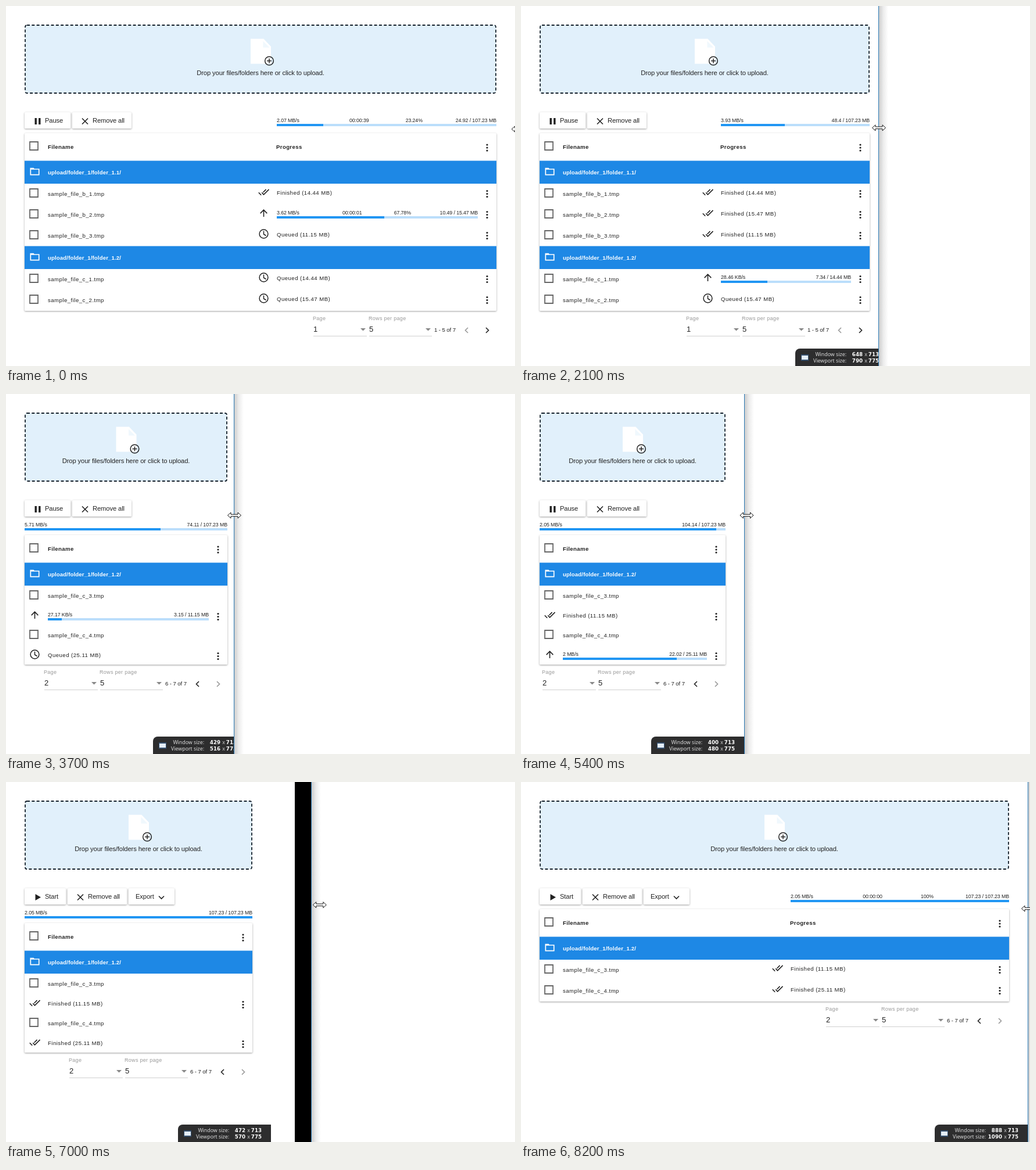
An HTML page with a canvas for the animation above (8500 ms loop, 876 px wide and 620 px high).

```html
<!DOCTYPE html>
<html lang="en">
<head>
<meta charset="utf-8">
<title>Responsive upload table</title>
<style>
html, body { margin: 0; width: 100%; height: 100%; overflow: hidden; background: #fff; }
canvas { display: block; }
</style>
</head>
<body>
<canvas id="stage" width="876" height="620"></canvas>
<script>
const ctx = document.getElementById('stage').getContext('2d');
const LOOP = 8500, LEFT = 32, TOTAL = 107.23, BAR_LAG = 2.2;
const INK = '#212121', BLUE = '#1e88e5', PALE = '#e1f0fb';

// Key points: ms, then window edge and the laid-out width that trails it.
const resize = [
  [600, 880, 876], [1500, 782, 800], [2100, 615, 632], [2800, 472, 497], [3700, 392, 413],
  [4200, 384, 384], [6500, 384, 384], [7000, 525, 456], [7400, 730, 672], [8200, 872, 872]
];
// Key points: ms, then megabytes sent and speed.
const upload = [
  [600, 24.924, 2.07], [2100, 48.4, 3.93], [2800, 60.74, 5.66],
  [3700, 74.114, 5.71], [5400, 104.14, 2.05], [5600, TOTAL, 2.05]
];

const files = [
  ['b_1', 14.438, 3.5, 'MB/s'], ['b_2', 15.47, 3.62, 'MB/s'], ['b_3', 11.15, 3.21, 'MB/s'],
  ['c_1', 14.44, 28.46, 'KB/s'], ['c_2', 15.47, 27.86, 'KB/s'],
  ['c_3', 11.15, 27.17, 'KB/s'], ['c_4', 25.11, 2, 'MB/s']
].map(([id, size, speed, unit]) => ({ id, size, speed, unit }));
files.reduce((sum, f) => (f.start = sum) + f.size, 0);
const pages = [
  [['1.1', files.slice(0, 3)], ['1.2', files.slice(3, 5)]],
  [['1.2', files.slice(5)]]
];

const SANS = '"Liberation Sans", Arial, sans-serif';
const type = {
  body: ['11.2px ' + SANS, -0.1],
  cell: ['9.6px ' + SANS, 0.47],
  head: ['bold 9.6px ' + SANS, 0.38],
  group: ['bold 9.6px ' + SANS, 0.15],
  stat: ['8.8px ' + SANS, -0.1],
  label: ['9px ' + SANS, 0.3],
  value: ['13px ' + SANS, 0],
  range: ['9.6px ' + SANS, -0.1],
  badge: ['8.8px "Noto Sans", sans-serif', 0],
  size: ['bold 8.7px "DejaVu Sans", sans-serif', 0]
};

const clamp = (v, lo = 0, hi = 1) => Math.min(hi, Math.max(lo, v));

function at(keys, t, col) {
  const i = keys.findIndex(k => k[0] > t);
  if (i < 1) return keys[i ? keys.length - 1 : 0][col];
  const a = keys[i - 1], b = keys[i];
  return a[col] + (b[col] - a[col]) * (t - a[0]) / (b[0] - a[0]);
}

function text(s, x, y, style, color = INK, align = 'left') {
  [ctx.font, ctx.letterSpacing] = [style[0], style[1] + 'px'];
  ctx.fillStyle = color;
  ctx.textAlign = align;
  ctx.fillText(s, x, y);
}

function rect(x, y, w, h, color) {
  ctx.fillStyle = color;
  ctx.fillRect(x, y, w, h);
}

function shape(d, x, y, { fill, line, width = 1.6 }) {
  const path = new Path2D(d);
  ctx.save();
  ctx.translate(x, y);
  if (fill) {
    ctx.fillStyle = fill;
    ctx.fill(path);
  }
  if (line) {
    ctx.strokeStyle = line;
    ctx.lineWidth = width;
    ctx.stroke(path);
  }
  ctx.restore();
}
const fill = (d, x, y, color = INK) => shape(d, x, y, { fill: color });
const stroke = (d, x, y, line = INK, width) => shape(d, x, y, { line, width });

function disc(x, y, r) {
  ctx.beginPath();
  ctx.arc(x, y, r, 0, 2 * Math.PI);
}

function ring(x, y, r, hands) {
  disc(x, y, r);
  ctx.strokeStyle = INK;
  ctx.lineWidth = 1.5;
  ctx.stroke();
  stroke(hands, x, y, INK, 1.5);
}

function dots(x, y) {
  ctx.fillStyle = INK;
  for (const d of [-5, 0, 5]) {
    disc(x, y + d, 1.6);
    ctx.fill();
  }
}

function card(x, y, w, h) {
  ctx.save();
  ctx.shadowColor = 'rgba(0,0,0,.38)';
  ctx.shadowBlur = 3;
  ctx.shadowOffsetY = 1;
  ctx.fillStyle = '#fff';
  ctx.beginPath();
  ctx.roundRect(x, y, w, h, 1.5);
  ctx.fill();
  ctx.restore();
}

const checkbox = y => stroke('M-7-7H7V7H-7Z', 48, y, '#666', 1.8);
const chevron = (x, y, dir, color) => stroke(`M${-2 * dir}-4.5L${2.5 * dir} 0L${-2 * dir} 4.5`, x, y, color);
const clockText = s => new Date(Math.floor(s) * 1000).toISOString().slice(11, 19);
const short = n => String(+n.toFixed(2));

function progress(x, right, y, p, full) {
  const w = right - x, mid = (s, k) => text(s, x + w * k, y, type.stat, INK, 'center');
  text(short(p.speed) + ' ' + p.unit, x, y, type.stat);
  if (full) {
    mid(clockText((p.size - p.value) / p.speed), 3 / 8);
    mid(short(p.value / p.size * 100) + '%', 5 / 8);
  }
  text(short(p.value) + ' / ' + short(p.size) + ' MB', right, y, type.stat, INK, 'right');
  rect(x, y + 3, w, 4, '#bbdefb');
  rect(x, y + 3, Math.round(w * clamp((p.value - p.lag) / p.size)), 4, '#2196f3');
}

function dropZone(right) {
  const cx = (LEFT + right) / 2;
  ctx.beginPath();
  ctx.roundRect(33, 33, right - 34, 117, 3);
  ctx.fillStyle = PALE;
  ctx.fill();
  ctx.strokeStyle = '#14202b';
  ctx.lineWidth = 1.8;
  ctx.setLineDash([5, 3.3]);
  ctx.stroke();
  ctx.setLineDash([]);
  shape('M-14-20H4L15.5-8V19H-15.5V-20Z', cx + 0.5, 78.5, { fill: '#fff', line: '#fff', width: 4 });
  fill('M4-18V-7H15Z', cx + 0.5, 78.5, '#f0f8fd');
  ring(cx + 15, 94.5, 7.3, 'M-4 0H4M0-4V4');
  text('Drop your files/folders here or click to upload.', cx, 119, type.body, INK, 'center');
}

function buttons(done) {
  const first = done ? 71 : 79, x = LEFT + first + 3;
  card(LEFT, 183, first, 28);
  fill(done ? 'M1 0L10.5 5.5L1 11Z' : 'M0 0H3.4V11H0ZM6.6 0H10V11H6.6Z', 49.5, 193);
  text(done ? 'Start' : 'Pause', 67, 201, type.body);
  card(x, 183, 102, 28);
  stroke('M-5-5L5 5M5-5L-5 5', x + 22, 198.5);
  text('Remove all', x + 35, 201, type.body);
  if (!done) return;
  card(211, 183, 79, 28);
  text('Export', 223, 201, type.body);
  stroke('M-4.5-2L0 2.5L4.5-2', 267.5, 198.5);
}

function table(s) {
  const { right, col, narrow } = s, groups = pages[s.page], rowH = narrow ? 68 : 36;
  const count = groups.reduce((n, g) => n + g[1].length, 0);
  let y = narrow ? 243 : 219;
  const bottom = y + 48 + 39 * groups.length + rowH * count;
  card(LEFT, y, right - LEFT, bottom - y);
  checkbox(y + 22);
  text('Filename', 72, y + 27, type.head);
  if (!narrow) text('Progress', col - 1, y + 27, type.head);
  dots(right - 16, y + 25);
  y += 48;
  for (const [folder, list] of groups) {
    rect(LEFT, y - 0.5, right - LEFT, 39.5, BLUE);
    stroke('M-7.2-5.4H-2.4L-1-4H7.2V5.6H-7.2ZM-7-4H0', 49.5, y + 18, '#fff', 1.7);
    text('upload/folder_1/folder_' + folder + '/', 72, y + 23, type.group, '#fff');
    y += 39;
    for (const f of list) {
      checkbox(y + 16);
      text('sample_file_' + f.id + '.tmp', 72, y + 21, type.cell);
      status(f, narrow ? 72 : col, narrow ? y + 36 : y, s);
      y += rowH;
    }
  }
  return bottom;
}

function status(f, x, y, { right, loaded, lag, wide }) {
  const value = loaded - f.start, ix = x - 22.5, iy = y + 14.5, size = ` (${short(f.size)} MB)`;
  dots(right - 16, y + 17.5);
  if (value > f.size - 0.01) {
    stroke('M-3.2 .8L0 4.4L9-4.6M-8.7 .8L-4.3 5.2M4-4.6L-1 .5', ix, iy);
    text('Finished' + size, x, y + 19, type.cell);
  } else if (value >= 0) {
    stroke('M0 6.4V-5M-5.8 .6L0-5.3L5.8 .6', ix, iy);
    progress(x, right - 32, y + 17, { ...f, value, lag }, wide);
  } else {
    ring(ix, iy, 7.4, 'M0-5V.5L4 3');
    text('Queued' + size, x, y + 19, type.cell);
  }
}

function pager(right, y, page) {
  const field = (x, w, label, value) => {
    text(label, x - 1, y + 16, type.label, '#999');
    text(value, x, y + 36, type.value);
    rect(x, y + 43, w, 1, '#d0d0d0');
    fill('M-4.5-2H4.5L0 2.5Z', x + w - 6.5, y + 32, '#888');
  };
  field(right - 315, 92, 'Page', page + 1);
  field(right - 219, 108, 'Rows per page', 5);
  text(page ? '6 - 7 of 7' : '1 - 5 of 7', right - 107, y + 36, type.range);
  chevron(right - 51, y + 33.5, -1, page ? INK : '#999');
  chevron(right - 16, y + 33.5, 1, page ? '#999' : INK);
}

function badge(view) {
  const x = view - 160;
  ctx.fillStyle = '#2d2d2e';
  ctx.beginPath();
  ctx.roundRect(x, 590, 160, 40, [8, 0, 0, 0]);
  ctx.fill();
  rect(x + 10, 600, 13, 11, '#36506e');
  rect(x + 11, 602, 11, 7, '#e4eef8');
  const line = (label, w, h, y) => {
    text(label, x + 88, y, type.badge, '#ddd', 'right');
    text(w, x + 116, y, type.size, '#fff', 'right');
    text('x', x + 121.5, y, type.badge, '#ccc', 'center');
    text(h, x + 144, y, type.size, '#fff', 'right');
  };
  line('Window size:', view + 16, 713, 603);
  line('Viewport size:', Math.round(view * 1.25), 775, 614);
}

function windowEdge(x, gap) {
  rect(x - gap, 0, gap, 620, '#000');
  rect(x, 0, 876, 620, '#fff');
  const shade = ctx.createLinearGradient(x, 0, x + 17, 0);
  shade.addColorStop(0, '#c8c8c8');
  shade.addColorStop(0.5, '#ececec');
  shade.addColorStop(1, '#fff');
  rect(x, 0, 17, 620, shade);
  rect(x, 0, 1, 620, '#2878b4');
}

function cursor(x, y) {
  shape('M-11.5 0L-6-5V-1.7H6V-5L11.5 0L6 5V1.7H-6V5Z', x, y, { fill: '#fff', line: '#111', width: 1 });
}

function draw(t) {
  const edge = Math.round(at(resize, t, 1)), view = Math.round(at(resize, t, 2));
  const right = view - 32, lead = Math.max(0, edge - view), loaded = at(upload, t, 1);
  const s = {
    right, loaded,
    col: Math.round(44 + right / 2),
    narrow: view < 480,
    wide: view >= 768,
    page: loaded > 70.97 ? 1 : 0,
    lag: BAR_LAG * clamp((5900 - t) / 300)
  };

  rect(0, 0, 876, 620, '#fff');
  dropZone(right);
  buttons(loaded > TOTAL - 0.01);
  progress(s.narrow ? LEFT : s.col, right, s.narrow ? 228 : 200,
    { speed: at(upload, t, 2), unit: 'MB/s', value: loaded, size: TOTAL, lag: s.lag }, s.wide);
  pager(right, table(s), s.page);
  if (t >= 700 && (t < 5500 || t >= 6200)) badge(view);
  windowEdge(edge, Math.round(lead * 0.4));
  cursor(Math.max(388.5, edge + 1 + lead * 0.2), 209 + 3 * clamp(1 - t / 2800) + 9 * clamp((t - 6500) / 1700));
}

function tick() {
  draw(Math.floor(performance.now() % LOOP / 100) * 100);
  requestAnimationFrame(tick);
}
tick();
</script>
</body>
</html>
```
